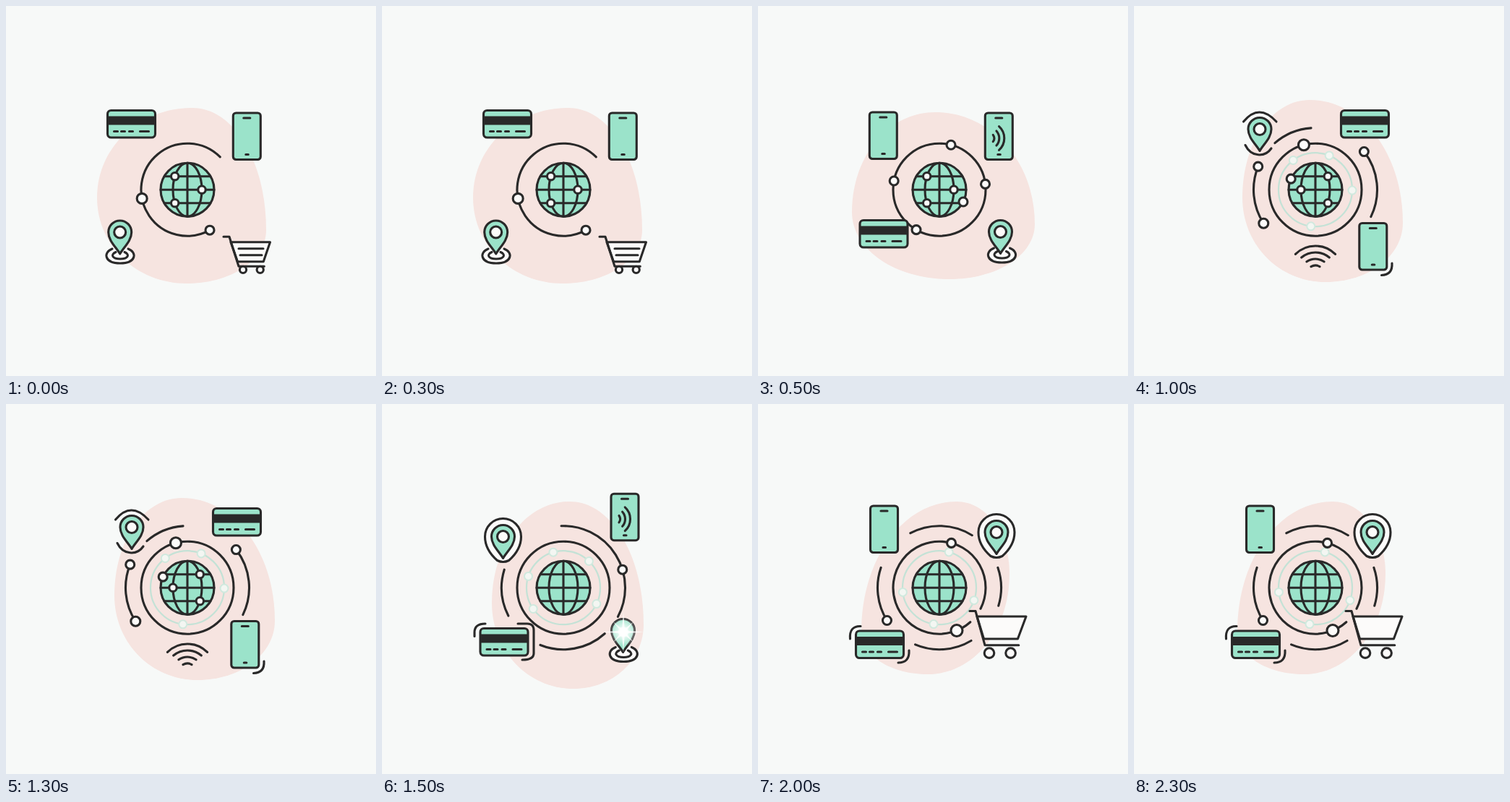
Write an HTML page that moves like this. It is 512 px wide and 512 px high and loops after 2500 ms.

```html
<!DOCTYPE html>
<html lang="en">
<head>
<meta charset="utf-8">
<title>Online shopping icons</title>
<style>
html, body { margin: 0; width: 100%; height: 100%; overflow: hidden; background: #f7f9f8; }
svg { display: block; width: 100%; height: 100%; }
.line { fill: none; stroke: #292929; stroke-width: 3.1; stroke-linecap: round; stroke-linejoin: round; }
.mint { fill: #9be3ca; }
.white { fill: #fcfbfa; }
.pale { fill: none; stroke: #c4e2d6; stroke-width: 2.2; }
.paleDot { fill: #f3f6f2; stroke: #d0e9de; stroke-width: 2; }
.blob { fill: #f6e4e0; }
.ray { fill: #fff; opacity: .8; }
.band { fill: #292929; }
</style>
</head>
<body>
<svg id="stage" viewBox="0 0 512 512">
<defs>
<radialGradient id="glow">
<stop offset="0" stop-color="#fff"/>
<stop offset=".35" stop-color="#fff" stop-opacity=".75"/>
<stop offset="1" stop-color="#fff" stop-opacity="0"/>
</radialGradient>
</defs>
</svg>
<script>
const CX = 251, CY = 254.2, STEP = 500;
const GLOBE = 37, PALE = 51, RING = 64, OUTER = 85.5;

const path = (d, cls = 'line') => `<path class="${cls}" d="${d}"/>`;
const circle = (x, y, r, cls = 'line white') => `<circle class="${cls}" cx="${x}" cy="${y}" r="${r}"/>`;
const rect = (w, h, r) => `<rect class="line mint" width="${w}" height="${h}" rx="${r}"/>`;
const at = (x, y, ...parts) => `<g transform="translate(${x} ${y})">${parts.join('')}</g>`;
const loop = (n, draw) => Array.from({ length: n }, (_, i) => draw(i)).join('');

const polar = (r, deg, x = CX, y = CY) => {
  const t = deg * Math.PI / 180;
  return [x + r * Math.cos(t), y + r * Math.sin(t)];
};

// Arc in degrees, clockwise from a to b
const arc = (r, a, b, x, y) =>
  path(`M${polar(r, a, x, y)}A${r} ${r} 0 ${b - a > 180 ? 1 : 0} 1 ${polar(r, b, x, y)}`);

const dot = (orbit, deg, r = 6, cls) => circle(...polar(orbit, deg), r, cls);

// Rounded shape through its top, right, bottom and left extremes
function blob([tx, ty], [rx, ry], [bx, by], [lx, ly]) {
  const mix = (a, b) => a + (b - a) * 0.56;
  return path(`M${tx} ${ty}
    C${mix(tx, rx)} ${ty} ${rx} ${mix(ry, ty)} ${rx} ${ry}
    C${rx} ${mix(ry, by)} ${mix(bx, rx)} ${by} ${bx} ${by}
    C${mix(bx, lx)} ${by} ${lx} ${mix(ly, by)} ${lx} ${ly}
    C${lx} ${mix(ly, ty)} ${mix(tx, lx)} ${ty} ${tx} ${ty}Z`, 'blob');
}

const ring = () => circle(CX, CY, RING, 'line');
const paleRing = (...angles) => circle(CX, CY, PALE, 'pale') +
  angles.map(a => dot(PALE, a, 5.5, 'paleDot')).join('');

const globe = () => at(CX, CY,
  circle(0, 0, GLOBE, 'line mint'),
  `<ellipse class="line" rx="20" ry="${GLOBE}"/>`,
  path('M0-37V37M-37 0H37M-32-18.5H32M-32 18.5H32'));

// Node where a meridian (side -1 or 1) meets a parallel (row -1, 0 or 1)
const node = (side, row) =>
  circle(CX + side * 20 * Math.sqrt(1 - row * row / 4), CY + row * GLOBE / 2, 5.2);

const card = (x, y) => at(x, y,
  rect(66, 37.5, 5), path('M0 8H66V20H0Z', 'band'),
  path('M9 29h5M19 29h5M30 29h5M45 29h12'));

const waves = () => loop(3, i => arc(8 + 7 * i, -36 - 6 * i, 36 + 6 * i, 4.5, 35));
const phone = (x, y, ...extra) => at(x, y,
  rect(38, 64.5, 4), path('M14.5 7h9M17.5 57.5h3.5'), ...extra);

const wifi = (x, y) => loop(4, i => arc(12 + 9 * i, -120 - 5 * i, -60 + 5 * i, x, y));

// Pins: the origin is the middle of the head
const drop = () => path('M0 30C-5 21-16 12-16 0A16 16 0 0 1 16 0C16 12 5 21 0 30Z', 'line mint');
const pin = (x, y) => at(x, y, drop(), circle(0, 0, 8));
const base = (x, y) => at(x, y,
  '<ellipse class="white" rx="19" ry="11"/>',
  path('M-11-9C-24-4-22 11 0 11S24-4 11-9M-6-4.5C-14-1-11 5 0 5S14-1 6-4.5'));
const framedPin = (x, y) =>
  at(x, y, path('M-8 33C-16 26-25 15-25 0A25 25 0 0 1 25 0C25 15 16 26 8 33Q0 37-8 33Z', 'line white')) +
  pin(x, y);

const star = (x, y) => at(x, y,
  '<circle r="20" fill="url(#glow)"/>',
  loop(8, i => `<g transform="rotate(${i * 45})">${path(`M0-2.2L${i % 2 ? 20 : 28} 0L0 2.2Z`, 'ray')}</g>`),
  circle(0, 0, 7, 'ray'));

// The origin is the basket's top left corner
function cart(x, y, w, h, wheel, gap, extra = '') {
  const bar = h + 2 + wheel, wy = bar + wheel + gap;
  return at(x, y,
    path(`M0 0H${w}L${w * 0.83} ${h}H9.5Z`, 'line white'),
    path(`M-10-7.5H-2L11 ${bar}H${w * 0.85}`), extra,
    circle(17, wy, wheel), circle(17 + w * 0.435, wy, wheel));
}

const scenes = [
  () => blob([258, 141], [360, 310], [250, 384], [126, 265]) +
    arc(RING, 61, 315) + globe() +
    dot(RING, 169, 7) + dot(RING, 61) + node(-1, -1) + node(1, 0) + node(-1, 1) +
    card(140.5, 144.5) + phone(314.3, 148) + base(158, 345) + pin(157.7, 313) +
    cart(311, 326.7, 54.5, 27, 4.6, 0, path('M11 9H45M13 18H43')),

  () => blob([245, 147], [383, 302], [265, 378], [130, 285]) +
    ring() + globe() + card(141, 296.5) +
    [-75.5, 191, -7, 120].map(a => dot(RING, a)).join('') +
    dot(GLOBE, 27) + node(-1, -1) + node(1, 0) + node(-1, 1) +
    phone(154.3, 147) + phone(314.3, 148, waves()) + base(337.5, 344) + pin(335.5, 312.5),

  () => blob([243, 130], [372, 300], [265, 382], [150, 265]) +
    paleRing(-127, -68, 1, 97) + ring() + globe() +
    arc(OUTER, -131, -94) + arc(OUTER, -38, 26) + arc(OUTER, 147, 202) +
    dot(RING, -104.5, 7.5) + dot(OUTER, -38) + dot(OUTER, 202) + dot(OUTER, 147, 6.5) +
    dot(GLOBE, 204) + node(1, -1) + node(-1, 0) + node(1, 1) +
    pin(174, 170.5) + path('M151.5 160Q173 134 197 160M154 192.5C162 209 181 210 190 197') +
    card(286.5, 144.5) + phone(311.8, 300.5) + path('M357 356Q358 372 342.5 372.5') +
    wifi(251, 371),

  () => blob([260, 135], [362, 305], [265, 394], [152, 275]) +
    paleRing(-106, -46, 198, 26, 145) + ring() + globe() +
    arc(OUTER, -92, 28) + arc(OUTER, 48, 112) + arc(OUTER, 153, 197) + dot(OUTER, -17) +
    framedPin(167.5, 183.5) + phone(317, 124.2, waves()) +
    path('M128 321.5V316Q128 304 143 304M188 304H201Q210 304 210 313V345Q210 354 194 354') +
    card(136, 310.5) + base(334.3, 345.5) + at(333.5, 313.5, drop()) + star(334, 315.5),

  () => blob([275, 135], [348, 235], [235, 374], [143, 315]) +
    paleRing(173, 20, 99, -75) + arc(RING, 48, 387) + globe() +
    arc(OUTER, -118, -58) + arc(OUTER, -19, 17) + arc(OUTER, 59, 113) + arc(OUTER, 148, 199) +
    dot(RING, -75) + dot(RING, 68, 8) + dot(OUTER, 148) +
    phone(155.5, 141) + framedPin(330, 177.5) +
    path('M127.5 325Q126 307 142 307.5M209 341Q210 358 194 358') + card(135.5, 314) +
    cart(303, 294, 68, 31, 6.8, 4)
];

const stage = document.getElementById('stage');
const groups = scenes.map(draw => {
  const g = document.createElementNS('http://www.w3.org/2000/svg', 'g');
  g.innerHTML = draw();
  stage.append(g);
  return g;
});

function render(time) {
  const now = Math.floor(Math.max(0, time) / STEP) % groups.length;
  groups.forEach((g, i) => { g.style.display = i === now ? '' : 'none'; });
}

const start = performance.now();
function tick() {
  render(performance.now() - start);
  requestAnimationFrame(tick);
}
tick();
</script>
</body>
</html>
```
